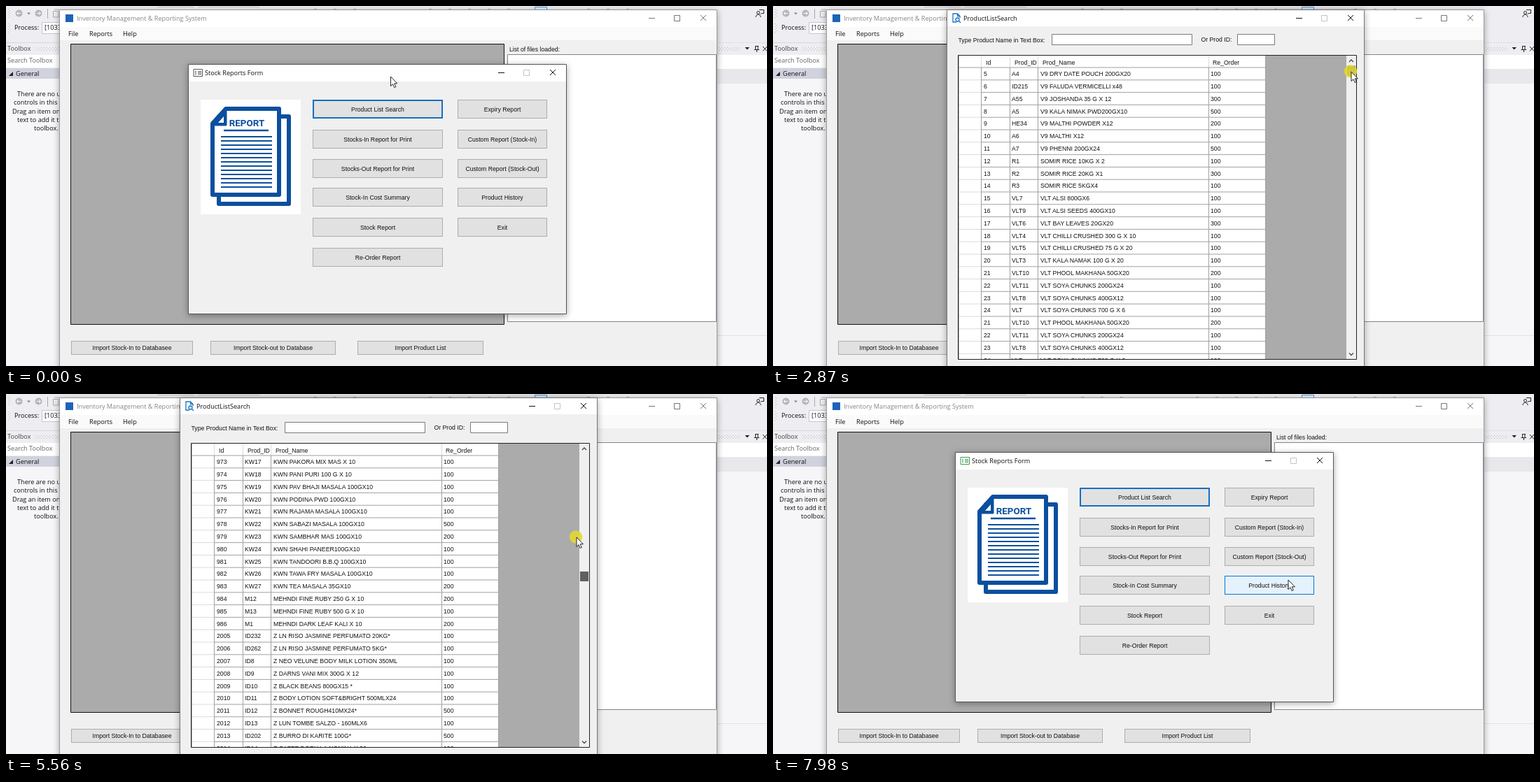
Animation, 1087 px wide and 515 px high, one loop 8000 ms. Source, as an HTML page:

```html
<!DOCTYPE html>
<html lang="en">
<head>
<meta charset="utf-8">
<title>Inventory reports</title>
<style>
html, body { margin: 0; width: 100%; height: 100%; overflow: hidden; background: #eeeef2; }
svg { display: block; width: 100vw; height: 100vh; }
text { font: 9.15px "Open Sans", "Noto Sans", sans-serif; fill: #111; white-space: pre; }
text.m { font: 8.7px "Liberation Sans", Arial, sans-serif; }
.mid { text-anchor: middle; }
.shadow { filter: drop-shadow(0 2px 5px rgba(0,0,0,.34)); }
.line { fill: none; stroke: #222; }
.btn rect { fill: #e1e1e1; stroke: #adadad; }
.btn.focus rect { stroke: #1470c0; stroke-width: 2; transform: translate(.5px, .5px); }
.btn.hot rect { fill: #e5f1fb; stroke: #0078d7; stroke-width: 1; transform: none; }
.btn.down rect { fill: #cce4f7; stroke: #005499; }
.ctl rect { fill: none; }
.ctl.hot rect { fill: #e81123; }
.ctl.hot path { stroke: #fff; }
.opening .late { display: none; }
#win { transform-origin: 546px 262px; animation: win 8s step-end infinite; }
#list { stroke: #555; animation: tint 8s step-end infinite; }
@keyframes win {
  0% { opacity: 0; transform: scale(.9); }
  16.77% { opacity: .2; transform: scale(.945); }
  17.93% { opacity: .58; transform: scale(.978); }
  19.1% { opacity: .9; transform: scale(.994); }
  20.27% { opacity: 1; transform: none; }
  87.98% { opacity: .65; transform: scale(.98); }
  89.15% { opacity: .2; transform: scale(.95); }
  90.32%, 100% { opacity: 0; transform: scale(.9); }
}
@keyframes tint { 0% { stroke: #555; } 88% { stroke: #3d9a4c; } }
</style>
</head>
<body>
<svg viewBox="0 0 1087 515" preserveAspectRatio="none">
  <defs>
    <clipPath id="side"><path d="M0 0H76V515H0Z"/></clipPath>
    <clipPath id="view"><path d="M266 71H819V505H266Z"/></clipPath>
  </defs>

  <!-- editor behind the windows -->
  <g id="ide" clip-path="url(#side)">
    <path fill="#f6f6f8" d="M0 104H77V515H0Z"/>
    <path fill="#fff" d="M0 70H77V88H0Z"/>
    <path fill="#d0d2dd" d="M0 89H77V104H0Z"/>
    <path stroke="#d5d6dd" d="M0 52.5H77"/>
    <g fill="#b4b4ba"><circle cx="18.5" cy="10.5" r="5"/><circle cx="46.5" cy="10.5" r="5"/></g>
    <path class="line" style="stroke:#fff" d="M21.5 10.5H16M18 8l-2.5 2.5L18 13M43.5 10.5H49M47 8l2.5 2.5L47 13"/>
    <path fill="#888" d="M30 9.5h5l-2.5 3Z"/>
    <path stroke="#bbb" stroke-dasharray="1 3" d="M3.5 4V18M5.5 6V18M3.5 25V39M5.5 27V39M42 59.5H76M44 61.5H76M42 63.5H76"/>
    <path class="line" style="stroke:#aaa" d="M59.5 4V18M67.5 7.5H75V16H67.5ZM69 5H77"/>
    <path fill="#fff" stroke="#c4c6d0" d="M51.5 23.5H90V39.5H51.5Z"/>
    <path fill="#222" d="M4 100h6v-6Z"/>
  </g>
  <g>
    <path stroke="#c8c8d0" d="M216 1.5H268M274 1.5H362"/>
    <path stroke="#b4b4bc" stroke-dasharray="4 24" d="M440 4.5H520M604 4.5H740M830 4.5H890"/>
    <path fill="#dcebfa" stroke="#5b93cf" d="M755.5 1.5H772.5V8H755.5Z"/>
    <path fill="#f6f6f8" d="M1015 111H1087V515H1015Z"/>
    <path fill="#fff" d="M1015 70H1087V90H1015Z"/>
    <path fill="#e8e8ec" d="M1015 90H1087V111H1015Z"/>
    <path stroke="#e0e0e6" d="M1015 52.5H1087M1015 471.5H1087"/>
    <path stroke="#bbb" stroke-dasharray="1 3" d="M1018 59.5H1050M1020 61.5H1050M1018 63.5H1050"/>
    <path fill="#222" d="M1055.5 59h6.5l-3.25 3.5Z"/>
    <path class="line" d="M1070 57.5H1075M1070.5 57V62M1074 57V62M1068.5 62.5H1076M1072.5 62.5V66M1081 58l6 6.5M1087 58l-6 6.5"/>
    <path class="line" d="M1076 5.5H1082.5V10.5H1079L1077.5 12M1071 16c0-5 7-5 7 0"/>
    <circle class="line" cx="1074.5" cy="9.5" r="2"/>
  </g>

  <!-- main window -->
  <g id="main">
    <g class="shadow"><path fill="#f0f0f0" stroke="#9a9a9a" d="M76.5 5.5H1015.5V530H76.5Z"/></g>
    <path fill="#fff" d="M77 6H1015V30H77Z"/>
    <path fill="#fafafa" d="M77 30H1015V49H77Z"/>
    <rect x="85" y="12" width="11" height="11" fill="#1d63b8"/>
    <path fill="#ababab" stroke="#111" d="M92.5 54.5H711.5V455.5H92.5Z"/>
    <path fill="#fff" stroke="#828790" d="M716.5 69.5H1014.5V451.5H716.5Z"/>
  </g>

  <!-- reports form -->
  <g id="form">
    <g class="shadow"><path fill="#f0f0f0" stroke="#555" d="M260.5 83.5H800.5V440.5H260.5Z"/></g>
    <path fill="#fff" d="M261 84H800V108H261ZM278 134H421V298H278Z"/>
    <path id="list" fill="none" d="M268 90.5H280.5V100.5H268ZM270 93.5H272M274 93.5H279M270 95.5H272M274 95.5H279M270 97.5H272M274 97.5H279"/>
    <g fill="#fff" stroke="#0b4f9f" stroke-width="6" stroke-linejoin="round">
      <path d="M304 158H404V283H304Z"/>
      <path d="M314 147H390V270H295V168Z"/>
      <path fill="#0b4f9f" stroke-width="3" d="M314 148V170H295Z"/>
      <path fill="#fff" stroke="none" d="M311 158V167H303Z"/>
      <path stroke-width="2.5" d="M311 178H375"/>
      <path id="lines" stroke-width="2"/>
    </g>
    <text x="344" y="172" class="mid" style="font:bold 13.4px Roboto,sans-serif;fill:#0b4f9f">REPORT</text>
  </g>

  <!-- product search window -->
  <g id="win">
    <g class="shadow"><path fill="#f0f0f0" stroke="#777" d="M248.5 5.5H844.5V560H248.5Z"/></g>
    <path fill="#fff" d="M249 6H844V29H249Z"/>
    <path class="line" style="stroke:#1a73c4;stroke-width:1.3" d="M262 23H257V11H263.5L267 14.5V17M263.5 11V14.5H267M265.5 21.5L268 24"/>
    <circle class="line" style="stroke:#1a73c4;stroke-width:1.3" cx="263.5" cy="19.5" r="2.5"/>
    <path fill="#fff" stroke="#7a7a7a" d="M398.5 40.5H598.5V55.5H398.5ZM663.5 40.5H716.5V55.5H663.5Z"/>
    <path fill="#ababab" d="M265 71H834V506H265Z"/>
    <path fill="#fff" d="M266 71H703V505H266ZM819 71H833V505H819Z"/>
    <path stroke="#dcdcdc" d="M297.5 71V88M338.5 71V88M378.5 71V88M622.5 71V88"/>
    <path stroke="#a0a0a0" d="M266 88H703M703.5 71V88"/>
    <g id="rows" clip-path="url(#view)"></g>
    <g class="late">
      <path fill="#f0f0f0" d="M819 71H833V505H819Z"/>
      <path class="line" style="stroke:#444;stroke-width:1.3" d="M823 80l3-3 3 3M823 496.5l3 3 3-3"/>
      <rect id="thumb" x="820" y="85" width="12" height="14"/>
      <path class="line" d="M264.5 70.5H833.5V505.5H264.5Z"/>
    </g>
  </g>

  <circle id="spot" r="9.2" fill="#e1d832" fill-opacity=".88"/>
  <path id="arrow" fill="#fff" stroke="#111" stroke-width=".9" d="M0 0V13.5L3 10.7 5.2 15.6 7.4 14.6 5.2 9.8H9.4Z"/>
</svg>

<script>
const LOOP = 8000, STEP = 93.4, DRAG_AT = 2836, PITCH = 17.8;
const $ = id => document.getElementById(id);

function add(parent, tag, attrs, text) {
  const el = document.createElementNS('http://www.w3.org/2000/svg', tag);
  for (const k in attrs) el.setAttribute(k, attrs[k]);
  if (text) el.textContent = text;
  return parent.appendChild(el);
}
// Text is placed by the middle of its capitals.
const label = (parent, x, y, text, cls = '', fill = '#111') =>
  add(parent, 'text', { x, y: y + 3.2, class: cls, style: `fill:${fill}` }, text);

const buttons = [];
function button(parent, x, y, w, h, text, cls = '') {
  const el = add(parent, 'g', { class: 'btn ' + cls });
  const edge = cls ? 2 : 1;
  add(el, 'rect', { x: x + .5, y: y + .5, width: w - edge, height: h - edge });
  label(el, x + w / 2, y + h / 2, text, 'm mid');
  buttons.push({ el, x, y, w, h });
}

function controls(parent, x, y, ink, dim) {
  const line = (d, stroke, to = parent) => add(to, 'path', { d, stroke, fill: 'none' });
  line(`M${x - 4} ${y + .5}h9`, ink);
  line(`M${x + 32.5} ${y - 3.5}h8v8h-8Z`, dim);
  const g = add(parent, 'g', { class: 'ctl' });
  add(g, 'rect', { x: x + 55, y: y - 11, width: 37, height: 23 });
  line(`M${x + 70} ${y - 4}l8 8m0 -8l-8 8`, ink, g);
  return g;
}

const ide = $('ide'), main = $('main'), form = $('form'), win = $('win');
label(ide, 12, 31, 'Process:');
label(ide, 55, 31, '[1033');
label(ide, 2, 61, 'Toolbox', '', '#444');
label(ide, 2, 78, 'Search Toolbox', '', '#666');
label(ide, 14, 96.5, 'General');
['16There are no usable', '11controls in this group.', '9Drag an item onto this', '16text to add it to the', '40toolbox.']
  .forEach((s, i) => label(ide, parseInt(s), 126 + i * 12.2, s.replace(/^\d+/, '')));

label(main, 101, 17.5, 'Inventory Management & Reporting System', '', '#858585');
label(main, 89, 39.5, 'File');
label(main, 119, 39.5, 'Reports');
label(main, 167, 39.5, 'Help');
label(main, 719, 62, 'List of files loaded:', 'm');
controls(main, 922, 17, '#777', '#777');
button(main, 93, 479, 174, 20, 'Import Stock-In to Databasee');
button(main, 292, 479, 179, 20, 'Import Stock-out to Database');
button(main, 502, 479, 180, 20, 'Import Product List');

label(form, 284, 95.5, 'Stock Reports Form');
controls(form, 707, 95, '#111', '#c4c4c4');
const tops = [134, 177, 219, 260, 303, 346];
['Product List Search', 'Stocks-In Report for Print', 'Stocks-Out Report for Print', 'Stock-In Cost Summary', 'Stock Report', 'Re-Order Report']
  .forEach((s, i) => button(form, 438, tops[i], 186, 27, s, i ? '' : 'focus'));
['Expiry Report', 'Custom Report (Stock-In)', 'Custom Report (Stock-Out)', 'Product History', 'Exit']
  .forEach((s, i) => button(form, 645, tops[i], 128, 27, s));
$('lines').setAttribute('d', Array.from({ length: 13 }, (_, i) => `M307 ${187 + i * 6}H380`).join(''));

label(win, 272, 17.5, 'ProductListSearch');
label(win, 264.5, 48.5, 'Type Product Name in Text Box:', 'm');
label(win, 611.5, 48, 'Or Prod ID:', 'm');
const closeBtn = controls(win, 751, 17, '#111', '#c4c4c4');
buttons.push({ el: closeBtn, x: 806, y: 6, w: 37, h: 23 });
[[304, 'Id'], [345, 'Prod_ID'], [385, 'Prod_Name'], [628, 'Re_Order']]
  .forEach(([x, s]) => label(win, x, 80.3, s, 'm'));

// Each line: product id, name, hundreds to re-order.
const blocks = {
  1: `A1 V9 ALUBUKHARA 200GX10 2
A2 V9 ANARDANA WHOLE 100GX20 3
A3 V9 BANFASHAX12 1
A137 V9 CLOVE OIL 30MLX12 1
A4 V9 DRY DATE POUCH 200GX20 1
ID215 V9 FALUDA VERMICELLI x48 1
A55 V9 JOSHANDA 35 G X 12 3
A5 V9 KALA NIMAK PWD200GX10 5
HE34 V9 MALTHI POWDER X12 2
A6 V9 MALTHI X12 1
A7 V9 PHENNI 200GX24 5
R1 SOMIR RICE 10KG X 2 1
R2 SOMIR RICE 20KG X1 3
R3 SOMIR RICE 5KGX4 1
VL7 VLT ALSI 800GX6 1
VLT9 VLT ALSI SEEDS 400GX10 1
VLT6 VLT BAY LEAVES 20GX20 3
VLT4 VLT CHILLI CRUSHED 300 G X 10 1
VLT5 VLT CHILLI CRUSHED 75 G X 20 1
VLT3 VLT KALA NAMAK 100 G X 20 1
VLT10 VLT PHOOL MAKHANA 50GX20 2
VLT11 VLT SOYA CHUNKS 200GX24 1
VLT8 VLT SOYA CHUNKS 400GX12 1
VLT VLT SOYA CHUNKS 700 G X 6 1`,
  973: `KW17 KWN PAKORA MIX MAS X 10 1
KW18 KWN PANI PURI 100 G X 10 1
KW19 KWN PAV BHAJI MASALA 100GX10 1
KW20 KWN PODINA PWD 100GX10 1
KW21 KWN RAJAMA MASALA 100GX10 1
KW22 KWN SABAZI MASALA 100GX10 5
KW23 KWN SAMBHAR MAS 100GX10 2
KW24 KWN SHAHI PANEER100GX10 1
KW25 KWN TANDOORI B.B.Q 100GX10 1
KW26 KWN TAWA FRY MASALA 100GX10 1
KW27 KWN TEA MASALA 35GX10 2
M12 MEHNDI FINE RUBY 250 G X 10 2
M13 MEHNDI FINE RUBY 500 G X 10 1
M1 MEHNDI DARK LEAF KALI X 10 2`,
  1099: `EJ10 EJ CHYAWANPARSH WITH SAFFRON 1KGX12 1
EJ4 EJ COCONUT OIL 200MLX36 5
EJ12 EJ COCONUT OIL JAR PACK 200MLX36 1
EJ14 EJ COCONUT OIL JAR PACK 500MLX24 1
EJ18 EJ FACE PACK MULTANI MITTI 60GMX96 1
EJ19 EJ FACE PACK NEEM CUCUMBER 60GMX96 1
EJ16 EJ FACE WASH NEEM &TULSI 60GMX96 1
EJ17 EJ FACE WASH ORANGE&ALOVERA 60GMX96 2
EJ15 EJ FACE WASH ORANGE&HONEY 60GMX96 3`,
  1507: `N22 NBL BOILED CHICK PEAS 400GX12 2
N23 NBL BOILED CHICK PEAS 800GX6 3
N24 NBL BOILED KALA CHANA 400GX12 1
N25 NBL BOILED RED KIDNEY 400GX12 1
N26 NBL CARDAMOM BLACK 200GX10 1
N27 NBL CARDAMOM BLACK 50GX20 5
N28 NBL CARDAMOM GREEN 200GX10 2
N29 NBL CARDAMOM GREEN 50GX20 1
N30 NBL CARDAMOM GREEN 750X6 1
N33 NBL CHANA DAL 1 KG X 10 5
N31 NBL CHANA DAL 2KGX6 3
N32 NBL CHANA DAL 500GX20 1
N34 NBL CHAR MAGAZ 100GX20 2
N35 NBL CHAR MAGAZ 300GX10 1
N36 NBL CHICK PEAS 1KGX10 1`,
  2005: `ID232 Z LN RISO JASMINE PERFUMATO 20KG* 1
ID262 Z LN RISO JASMINE PERFUMATO 5KG* 1
ID8 Z NEO VELUNE BODY MILK LOTION 350ML 1
ID9 Z DARNS VANI MIX 300G X 12 1
ID10 Z BLACK BEANS 800GX15 * 1
ID11 Z BODY LOTION SOFT&BRIGHT 500MLX24 1
ID12 Z BONNET ROUGH410MX24* 5
ID13 Z LUN TOMBE SALZO - 160MLX6 1
ID202 Z BURRO DI KARITE 100G* 5
ID14 Z CAFFE DORU LA NONINA X 20 1`
};
const stock = {};
for (const first in blocks) blocks[first].split('\n').forEach((s, i) => {
  const [, pid, name, hundreds] = s.match(/^(\S+) (.+) (\d)$/);
  stock[+first + i] = [pid, name, hundreds + '00'];
});

const brands = ['VLT', 'BELU', 'DORSA', 'GANIM', 'KWN', 'EJ', 'LORU', 'NBL', 'TAVI', 'Z'];
const goods = ['BASMATI RICE', 'BLACK PEPPER', 'CHANA DAL', 'CORIANDER PWD', 'CUMIN SEEDS', 'GARLIC PASTE', 'GINGER PWD', 'MANGO PICKLE', 'MUSTARD OIL', 'RED LENTILS', 'TURMERIC PWD'];
const sizes = ['100GX20', '200GX10', '400GX12', '1KGX10', '500MLX24'];
const pick = (list, n) => list[n % list.length];
function product(id) {
  const brand = pick(brands, Math.floor(id / 225));
  return stock[id] || [brand[0] + id % 90, `${brand} ${pick(goods, id >> 2)} ${pick(sizes, id)}`, pick([1, 1, 2, 1, 3, 1, 5], id * 3) + '00'];
}

const rows = Array.from({ length: 24 }, (_, k) => {
  const y = 88 + k * PITCH, g = add($('rows'), 'g', { class: k < 8 ? '' : 'late' });
  add(g, 'path', { stroke: '#dcdcdc', d: `M266 ${y + PITCH}H297` });
  add(g, 'path', { stroke: '#a0a0a0', d: `M297 ${y + PITCH}H703` + [297.5, 338.5, 378.5, 622.5, 703.5].map(x => `M${x} ${y}v${PITCH}`).join('') });
  const mark = add(g, 'g', {});
  add(mark, 'rect', { x: 298, y: y + .5, width: 40, height: PITCH - 1, fill: '#0078d7' });
  add(mark, 'path', { d: `M271 ${y + 5.5}l4 4-4 4Z`, fill: '#222' });
  return { mark, cells: [301, 341, 382, 625].map(x => label(g, x, y + 9, '', 'm')) };
});
function fillRow({ mark, cells }, id) {
  [id, ...product(id)].forEach((s, i) => cells[i].textContent = s);
  mark.style.display = id === 1 ? '' : 'none';
  cells[0].style.fill = id === 1 ? '#fff' : '#111';
}

// Points are [step, value, ...]; values between them are linear.
function along(points, n) {
  if (n <= points[0][0]) return points[0].slice(1);
  const j = points.findIndex(p => p[0] >= n);
  if (j < 0) return points[points.length - 1].slice(1);
  const a = points[j - 1], b = points[j], f = (n - a[0]) / (b[0] - a[0]);
  return a.slice(1).map((v, i) => v + (b[i + 1] - v) * f);
}
const scroll = [[-1, 1], [0, 5], [1, 6], [4, 150], [8, 560], [10, 1084], [11, 1507], [12, 1720], [14, 1960], [18, 2150],
  [22, 2230], [26, 2080], [28, 1991], [29, 973], [30, 644], [33, 60], [35, 1]];
const path = [[-26, 549.5, 101], [-25, 548, 114], [-24, 546.5, 130], [-23, 546, 137.5], [-10, 546, 137.5], [-9, 562, 135],
  [-7, 655, 121], [-5, 775, 103], [-3, 826, 93.5], [0, 826, 94], [11, 813, 94], [29, 815, 94], [34, 828, 94], [35, 829, 84],
  [39, 836, 51], [42, 828, 17], [48, 828, 17], [50, 800, 75], [52, 763, 148], [53, 752, 186], [54, 743, 228], [55, 736, 266]];
const topRow = n => Math.round(along(scroll, n)[0]);
const TRACK = .1738;

function draw(n) {
  let [x, y] = along(path, n);
  // While dragging, the pointer runs one step ahead of the thumb.
  if (n >= 0 && n < 35) y = 93 + TRACK * topRow(n + 1);
  const dragging = n >= -3 && n < 36;
  const down = dragging || n === -20 || n === -19 || n === 44;
  $('arrow').setAttribute('transform', `translate(${x} ${y})`);
  $('spot').setAttribute('transform', `translate(${x - 1} ${y - .5})`);
  $('spot').style.display = down ? '' : 'none';
  for (const b of buttons) {
    const over = x >= b.x && x < b.x + b.w && y >= b.y && y < b.y + b.h;
    b.el.classList.toggle('hot', over);
    b.el.classList.toggle('down', over && down);
  }
  win.classList.toggle('opening', n < -12);
  $('thumb').setAttribute('y', 85 + TRACK * (topRow(n) - 1));
  $('thumb').setAttribute('fill', dragging ? '#606060' : '#cdcdcd');
  // The lower part of the grid repaints one step late.
  const fresh = n > 0 ? (n > 20 ? 14 : 15) : 20;
  rows.forEach((r, k) => fillRow(r, topRow(k < fresh ? n : n - 1) + k));
}

let start, shown;
function tick(now) {
  start ??= now;
  const n = Math.floor(((now - start) % LOOP - DRAG_AT) / STEP);
  if (n !== shown) draw(shown = n);
  requestAnimationFrame(tick);
}
draw(-31);
requestAnimationFrame(tick);
</script>
</body>
</html>
```
